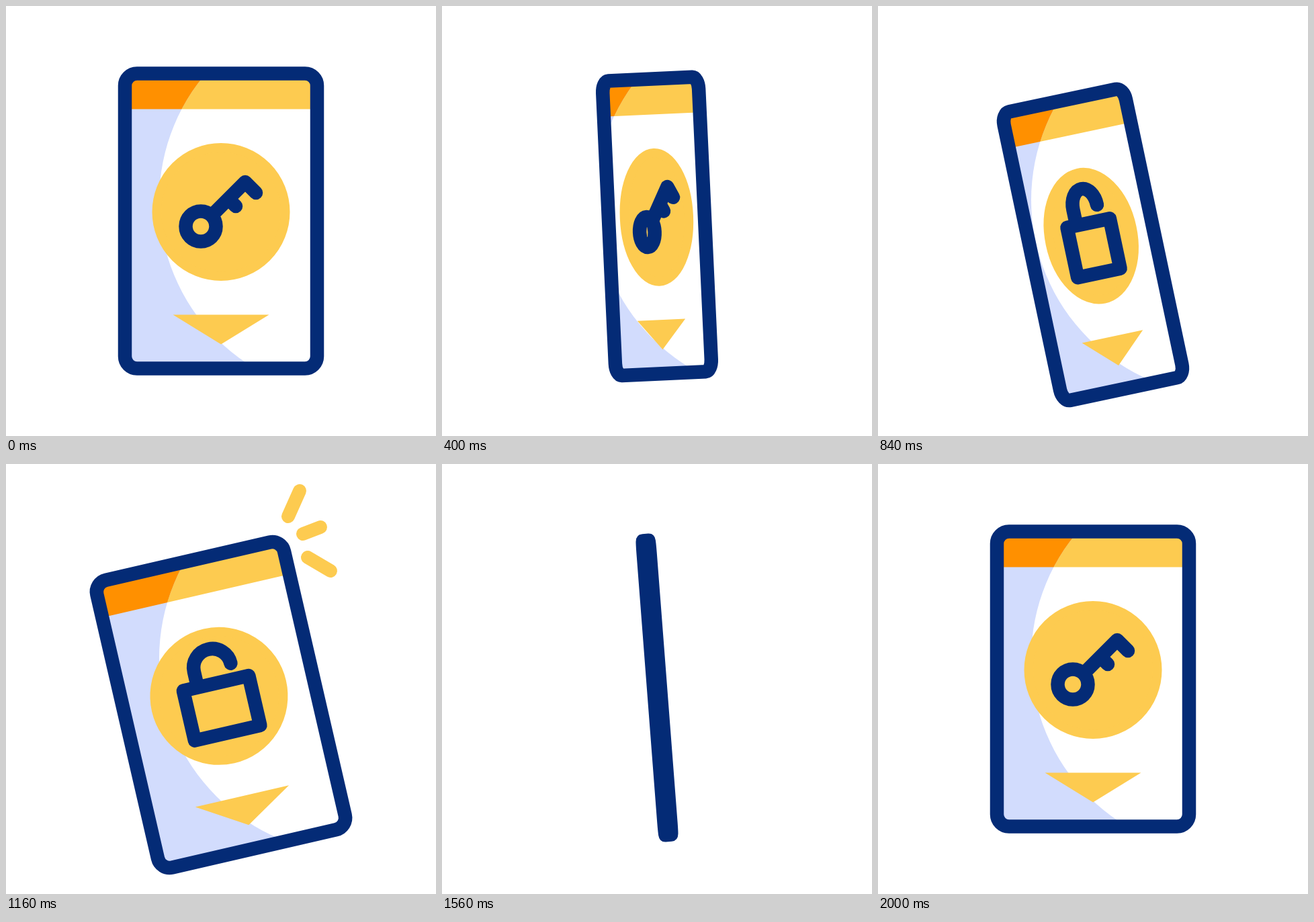
Write an HTML page with a canvas that moves like this. It is 640x640 px and loops after 2200 ms.

```html
<!DOCTYPE html>
<html lang="en">
<head>
<meta charset="utf-8">
<title>Card flip</title>
<style>
  html, body { margin: 0; width: 100%; height: 100%; overflow: hidden; background: #fff; }
  canvas { display: block; }
</style>
</head>
<body>
<canvas id="stage" width="640" height="640"></canvas>
<script>
const ctx = document.getElementById('stage').getContext('2d');
const LOOP = 2200, STEP = 40;
const NAVY = '#042b76', YELLOW = '#fdcb50', ORANGE = '#ff9000', SHADE = '#d2dcfd';

// Tilt in degrees: [time, angle]
const TILT_IN = [[200, 0], [400, 2.65], [560, 7.4], [760, 11], [840, 11.95], [1000, 13]];
const TILT_OUT = [[1240, 13], [1320, 11.6], [1560, 4.4], [1880, 0.43], [2000, 0]];
const RAYS = [[420, 78, 437, 40], [442, 104, 468, 94], [449, 139, 483, 159]];

function ramp(t, from, to) {
  const u = Math.min(1, Math.max(0, (t - from) / (to - from)));
  return u * u * (3 - 2 * u);
}

// Smooth curve through the keys, at rest at both ends
function spline(keys, t) {
  const last = keys.length - 1;
  if (t <= keys[0][0]) return keys[0][1];
  if (t >= keys[last][0]) return keys[last][1];
  const slope = k => k === 0 || k === last ? 0 :
    (keys[k + 1][1] - keys[k - 1][1]) / (keys[k + 1][0] - keys[k - 1][0]);
  const i = keys.findIndex(k => k[0] > t) - 1;
  const [t0, a] = keys[i], [t1, b] = keys[i + 1];
  const d = t1 - t0, u = (t - t0) / d, v = 1 - u;
  return a * v * v * (1 + 2 * u) + b * u * u * (1 + 2 * v) +
    d * u * v * (slope(i) * v - slope(i + 1) * u);
}

function flipWidth(t) {
  const start = t < 1120 ? 200 : 1240, mid = t < 1120 ? 600 : 1600;
  const w = t < mid ? 1 - ramp(t, start, mid) : ramp(t, mid, mid + 400);
  return Math.max(w, 0.004);
}

// Shapes squash with the card while line weights stay constant
function squash(path, w) {
  const out = new Path2D();
  out.addPath(path, new DOMMatrix([w, 0, 0, 1, 0, 0]));
  return out;
}

function stroke(path, color, width) {
  ctx.strokeStyle = color;
  ctx.lineWidth = width;
  ctx.stroke(path);
}

function fill(path, color) {
  ctx.fillStyle = color;
  ctx.fill(path);
}

const card = new Path2D();
card.roundRect(-143, -219.5, 286, 439, 18);
const header = new Path2D('M-143-219.5H143V-166.5H-143Z');
const arrow = new Path2D('M-71.5 139.5H71.5L0 183.5Z');
const disc = new Path2D();
disc.arc(0, -13.5, 95.75, 0, 7);
const key = new Path2D('M-14-8L36-58L52-42M11-33L22-22M-7.5 8A22.5 22.5 0 1 1-52.5 8A22.5 22.5 0 1 1-7.5 8Z');
const lock = new Path2D('M-50-33H50V43H-50ZM-28-33V-57A28 28 0 0 1 28-57');
// Everything outside a large circle that stays still on the stage
const outside = new Path2D('M0 0H640V640H0Z');
outside.moveTo(810, 289);
outside.arc(519, 289, 291, 0, Math.PI * 2);

function drawRays(t) {
  const head = ramp(t, 920, 1080), tail = ramp(t, 1180, 1320);
  if (head <= tail) return;
  for (const [x0, y0, x1, y1] of RAYS) {
    const ray = new Path2D();
    ray.moveTo(x0 + (x1 - x0) * tail, y0 + (y1 - y0) * tail);
    ray.lineTo(x0 + (x1 - x0) * head, y0 + (y1 - y0) * head);
    stroke(ray, YELLOW, 20);
  }
}

function draw(t) {
  const w = flipWidth(t);
  const tilt = spline(t < 1120 ? TILT_IN : TILT_OUT, t);
  const pose = () => {
    ctx.setTransform(1, 0, 0, 1, 320, 320 + 2.96 * tilt);
    ctx.rotate(-tilt * Math.PI / 180);
  };
  const face = squash(card, w), band = squash(header, w);

  ctx.resetTransform();
  ctx.fillStyle = '#fff';
  ctx.fillRect(0, 0, 640, 640);
  ctx.lineCap = ctx.lineJoin = 'round';
  drawRays(t);

  ctx.save();
  pose();
  ctx.clip(face);
  fill(face, '#fff');
  fill(band, YELLOW);
  ctx.save();
  ctx.resetTransform();
  ctx.clip(outside, 'evenodd');
  pose();
  fill(face, SHADE);
  fill(band, ORANGE);
  ctx.restore();

  fill(squash(arrow, w), YELLOW);
  const badge = squash(disc, w);
  fill(badge, YELLOW);
  stroke(badge, YELLOW, 13.5);
  stroke(squash(t >= 600 && t < 1600 ? lock : key, w), NAVY, 20.5);
  ctx.restore();

  pose();
  stroke(face, NAVY, 20.5);
}

const begin = performance.now();
function tick() {
  const t = (performance.now() - begin) % LOOP;
  draw(Math.floor(t / STEP) * STEP);
  requestAnimationFrame(tick);
}
tick();
</script>
</body>
</html>
```
